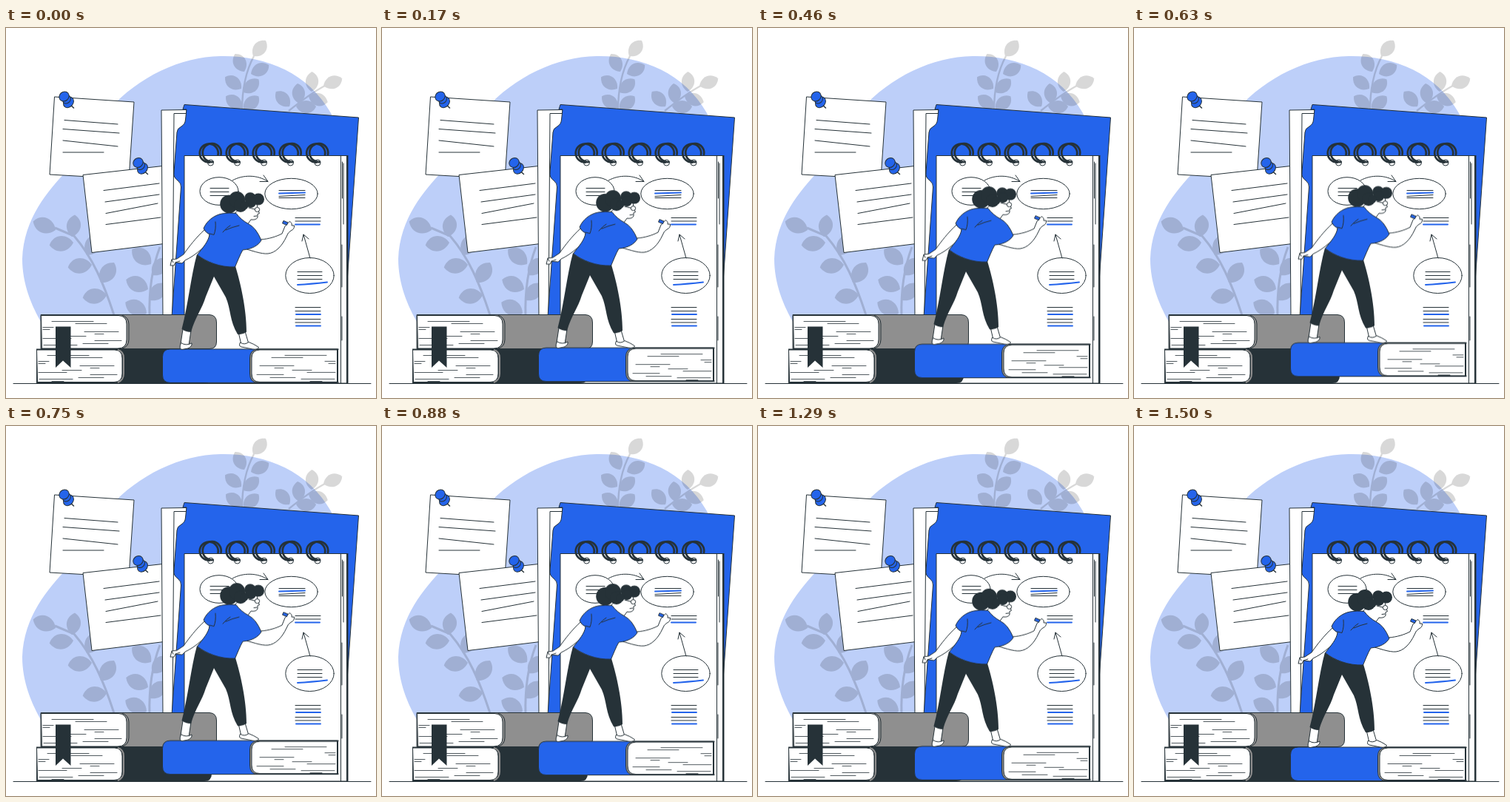
Write an HTML page without scripts that moves like this. It is 500x500 px and loops after 1.54 s.

```html
<!DOCTYPE html>
<html lang="en">
<head>
<meta charset="utf-8">
<title>Planning board</title>
<style>
  html, body { margin: 0; width: 100%; height: 100%; overflow: hidden; background: #fff; }
  svg { display: block; width: 100%; height: 100%; }
  .line { fill: none; stroke: #263238; stroke-linecap: round; stroke-linejoin: round; }
  .paper { fill: #fff; stroke: #263238; stroke-linejoin: round; }
  .blue { fill: #2464eb; stroke: #263238; stroke-linejoin: round; }
  .gray { fill: #8f8f8f; stroke: #263238; }
  .dark { fill: #263238; }
  .mark { fill: none; stroke: #2464eb; stroke-width: 1.9; stroke-linecap: round; }
  .float { animation: float 1540ms cubic-bezier(.37, 0, .63, 1) -60ms infinite; }
  @keyframes float { 50% { transform: translateY(-8.9px); } }
</style>
</head>
<body>
<svg viewBox="0 0 500 500">
  <defs>
    <path id="leaf" d="M0 0C-11 -6 -13 -19 -2 -27C11 -22 11 -7 0 0Z"/>
    <g id="pin">
      <path class="line" stroke-width="1.5" d="M7 9L11.5 13"/>
      <ellipse class="blue" cx="4.500" cy="5.500" rx="7.800" ry="6.200" transform="rotate(-48 4.500 5.500)"/>
      <ellipse class="blue" cx="2" cy="1.500" rx="6" ry="5" transform="rotate(-48 2 1.500)"/>
      <ellipse class="blue" cx="-1.500" cy="-2.500" rx="7" ry="6.200" transform="rotate(-40 -1.500 -2.500)"/>
    </g>
    <g id="ring">
      <circle class="paper" cy="182" r="4"/>
      <path id="coil" class="line" stroke-width="2.700" d="M-1 181.500A12.500 12.500 0 1 1 10 171.500"/>
      <use href="#coil" x="4" y="-.5"/>
    </g>
    <path id="grain" class="line" stroke-width=".8" d="M14 7.500H70M46 10.500H88M2 15.500H16M2 18.500H11M58 21.500H104M72 24.500H84M34 27.500H60M2 30.500H40M72 33.500H108M56 37.500H90M3 39.500H48M20 42.500H36"/>
  </defs>

  <path fill="#bdcff9" d="M290 38C350 37 408 60 439 115C465 170 440 300 400 400H49C34 375 22 345 22 312C24 257 57 220 82 193C120 162 118 134 140 109C180 66 235 39 290 38Z"/>

  <g opacity=".15">
    <g fill="none" stroke="#000" stroke-width="2.400">
      <path d="M319 112C319 88 322 62 335 38M382 112C397 100 414 87 431 78"/>
      <path stroke-width="3" d="M146 388C132 345 117 310 92 281L66 270M194 390C193 357 197 325 208 296"/>
    </g>
    <use href="#leaf" transform="translate(334 38) rotate(43)"/>
    <use href="#leaf" transform="translate(322 59) rotate(-24)"/>
    <use href="#leaf" transform="translate(331 62) rotate(68)"/>
    <use href="#leaf" transform="translate(318 82) rotate(-50)"/>
    <use href="#leaf" transform="translate(321 87) rotate(53)"/>
    <use href="#leaf" transform="translate(319 108) rotate(-50)"/>
    <use href="#leaf" transform="translate(321 110) rotate(53)"/>
    <use href="#leaf" transform="translate(429 78) rotate(73)"/>
    <use href="#leaf" transform="translate(413 86) rotate(5)"/>
    <use href="#leaf" transform="translate(409 92) rotate(112)"/>
    <use href="#leaf" transform="translate(396 102) rotate(0)"/>
    <use href="#leaf" transform="translate(392 106) rotate(95)"/>
    <use href="#leaf" transform="translate(383 106) rotate(-38)"/>
    <use href="#leaf" transform="translate(67 273) rotate(-65) scale(1.2)"/>
    <use href="#leaf" transform="translate(89 282) rotate(12) scale(1.1)"/>
    <use href="#leaf" transform="translate(91 290) rotate(-92) scale(1.2)"/>
    <use href="#leaf" transform="translate(109 307) rotate(33) scale(1.2)"/>
    <use href="#leaf" transform="translate(116 320) rotate(-92) scale(1.2)"/>
    <use href="#leaf" transform="translate(128 344) rotate(38) scale(1.2)"/>
    <use href="#leaf" transform="translate(136 361) rotate(-92) scale(1.2)"/>
    <use href="#leaf" transform="translate(196 319) rotate(-48) scale(1.2)"/>
    <use href="#leaf" transform="translate(198 334) rotate(43) scale(1.1)"/>
    <use href="#leaf" transform="translate(192 353) rotate(-62) scale(1.2)"/>
    <use href="#leaf" transform="translate(195 368) rotate(43) scale(1.1)"/>
    <use href="#leaf" transform="translate(190 386) rotate(-58) scale(1.2)"/>
  </g>

  <!-- Notes -->
  <path class="paper" d="M65.500 93L173 100L166 204L59 198Z"/>
  <path class="line" d="M79 124.500L151 130M77 136.500L153 142M77 152L151 160M77 168H132"/>
  <use href="#pin" x="80" y="95"/>
  <path class="paper" d="M104 198.500L216 186L226 290L116 303.500Z"/>
  <path class="line" d="M132 219.500L207 210M134 235L207 225M135 250.500L205 237M135 265.500L209 256"/>
  <use href="#pin" x="180" y="184.500"/>

  <!-- Folder and pad -->
  <path class="paper" d="M210 111L244 110.500L244 390H212Z"/>
  <path class="paper" d="M227 115.500H244V390H225Z"/>
  <path class="blue" d="M241 103.500L476.500 121L457 400L224 390L236.500 215Q237 210 232 206Q226 202 227 195L231 141Q231 136 237 133Q242 130 242.500 124L244 110H239Z"/>
  <path class="paper" d="M241 172.500H461V480H241Z"/>
  <path class="line" d="M452.500 173V480M454.500 181V230M456 183V265M454 293V350M454 390V422"/>
  <path class="dark" d="M460 172H462.500V480H460Z"/>
  <use href="#ring" x="276.500"/>
  <use href="#ring" x="312.500"/>
  <use href="#ring" x="348.500"/>
  <use href="#ring" x="384.500"/>
  <use href="#ring" x="421"/>

  <g class="line">
    <ellipse cx="288" cy="220.500" rx="26" ry="18.800"/>
    <ellipse cx="385.500" cy="224" rx="35.700" ry="20.700"/>
    <ellipse cx="410.500" cy="334.500" rx="32.700" ry="24"/>
    <path d="M276 216.500H301M276 221.500H301M276 226.500H301M369 219.500H404M369 227.500L404 225.500M369 229.500H404M391 256.500H425M391 261H425M394 329.500H427M394 334.500H427M394 339.500H427M391 377.500H425M391 382.500H425M391 393.500H425M391 398H425"/>
    <path d="M306 206C320 198 340 198 354 207.500M348 199L354 207.500L343 207.500M411 311L402 279M400 288L402 279L409 285"/>
  </g>
  <path class="mark" d="M369 223.500L404 222.500M391 265.500H424M394 347Q412 346 434 343.500M392 387H425M392 402.500H425"/>

  <path class="line" d="M10 480.500H493"/>

  <!-- Resting books -->
  <path class="gray" d="M47 387.500H275Q284.500 388 284.500 398V424Q284.500 433.500 275 433.500H47Z"/>
  <path class="paper" d="M47.500 388.500H152Q163 389 163 400V421Q163 433 151 433H48.500Z"/>
  <path class="line" d="M157 388Q166 391 166 400V421Q166 431 157 433"/>
  <use href="#grain" x="48" y="389"/>
  <path class="dark" d="M41 433.500H268Q278 434 278 444V470Q278 480 268 480H41Z"/>
  <path class="paper" d="M41.500 435H147Q157 435.500 157 446V467Q157 478.500 146 478.500H42.500Z"/>
  <path fill="none" stroke="#8f8f8f" stroke-width="2" d="M151 435Q159 437 159 446V467Q159 476 151 479"/>
  <use href="#grain" x="42" y="435"/>
  <path class="dark" d="M67 403.500H87.500V459L77 449.500L67 459Z"/>

  <g class="float">
    <path class="blue" d="M222 434H340V479.500H222Q211.500 479.500 211.500 469V444.500Q211.500 434 222 434Z"/>
    <path class="gray" d="M448.500 434H341Q329.500 435 329.500 446V467Q329.500 479.500 341 479.500H448.500Z"/>
    <path class="paper" d="M447.500 435H343Q332 435.500 332 446V467Q332 478.500 343 478.500H447.500Z"/>
    <path class="line" stroke-width="1.400" d="M338 434.300H449M338 479H449"/>
    <use href="#grain" transform="translate(447 435) scale(-1 1)"/>

    <!-- Feet and legs -->
    <path class="paper" d="M239 407L236 427L247 429L250 409ZM314 411L318 428L328 427L323 410Z"/>
    <path class="paper" d="M236.500 425.500Q233 434.500 238 434.500L246 433Q252 430 251 426Q243 430 236.500 425.500ZM316.500 425Q314 430 318 431L333 434Q341 435 341.500 431.500Q335 427 328 424.500Q322 429 316.500 425Z"/>
    <path class="dark" d="M258 306C270 317 290 323 310 322C317 345 325 380 325 411Q319 415 313 414C302 396 304 380 297 364L281 336L270 363C265 380 256 390 250 411Q243 411 237.500 407C246 375 250 335 258 306Z"/>

    <!-- Arms -->
    <path class="paper" d="M268 273C257 283 247 296 240 306L231 312L224 313L222 321L227 321L229 317L238 318L242 314C257 307 271 294 281 279Z"/>
    <path class="line" d="M224 313L226 317M229 317L235 315"/>
    <path class="paper" d="M344 286C356 285 365 282 373 278L377 268L383 261.500Q387 263 386 267L389.500 267Q390 272 385 274Q381 276 379 282C373 295 364 304 354 305C345 306 330 300 321 298Z"/>
    <path class="blue" d="M375 260.500L381 263L379.500 266.500L373.500 264Z"/>

    <!-- Head and shirt -->
    <path class="paper" d="M339 237L340 245L342.500 250.500L340 251.500V256Q338 260 331 259L326 266L306 253L321 240Z"/>
    <path class="blue" d="M267 271C271 261 281 253 292 251Q302 249 311 250.500Q317 259 328 265Q338 270 345 287C341 294 332 299 320 300C316 307 313 315 309.500 323C290 324 270 316 258.500 306.500C266 297 274 288 275 279Q270 277 267 271Z"/>
    <path class="line" d="M275 278L281 279.500Q284 272 283 262M293 276Q299 269 303 267M297 273Q306 269 315 267"/>
    <g class="dark">
      <circle cx="301.500" cy="238" r="12.300"/>
      <circle cx="312" cy="232" r="11"/>
      <circle cx="317" cy="240" r="9"/>
      <circle cx="330" cy="230" r="7.800"/>
      <circle cx="341" cy="231.500" r="8"/>
      <circle cx="331" cy="236" r="7"/>
      <circle cx="322" cy="240" r="5.500"/>
    </g>
    <ellipse class="paper" cx="339.500" cy="245.500" rx="3.200" ry="3"/>
    <path class="line" d="M328 243L336 245M335 254.500L339 254"/>
  </g>
</svg>
</body>
</html>
```
